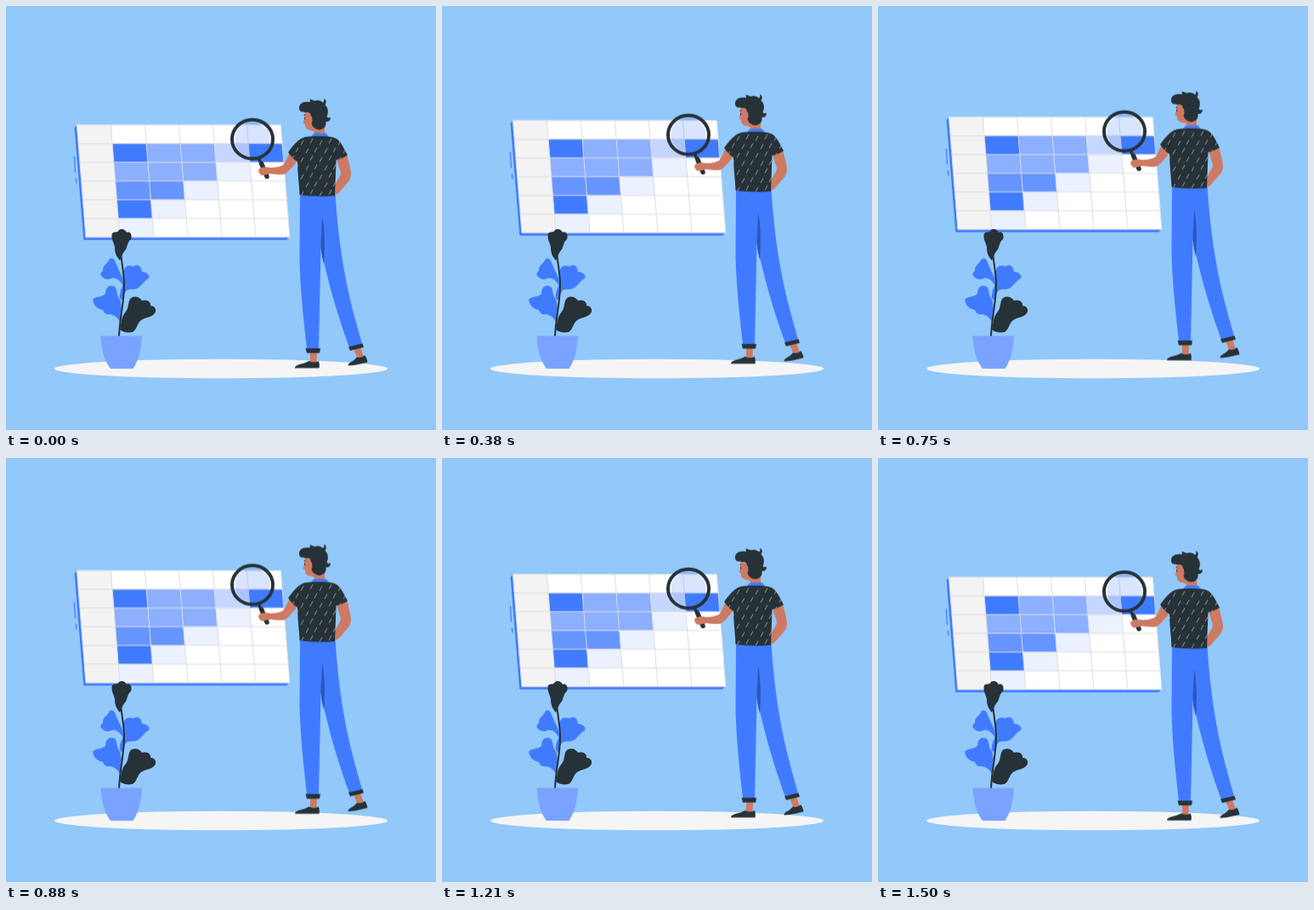
Animation of 506x498 px, one loop 1.54 s. Source, as an HTML page:

```html
<!DOCTYPE html>
<html lang="en">
<head>
<meta charset="utf-8">
<title>Chart review</title>
<style>
  html, body { margin: 0; width: 100%; height: 100%; overflow: hidden; background: #92c8fa; }
  svg { display: block; width: 100vw; height: 100vh; }
  .blue { fill: #407bff; }
  .dark { fill: #263238; }
  .skin { fill: #ce7a63; }
  .float { animation: float 1540ms linear infinite; }
  @keyframes float {
    0% { transform: translateY(0); }
    46% { transform: translateY(-9.9px); }
    96% { transform: translateY(.3px); }
    100% { transform: translateY(0); }
  }
</style>
</head>
<body>
<svg viewBox="0 0 506 498">
  <defs>
    <pattern id="dashes" width="22" height="20" patternUnits="userSpaceOnUse" patternTransform="translate(345 155)">
      <path d="M2 8.500L5 3M13 6.500L16 1M8 18L11 12.500M18 17L21 11.500" stroke="#a9b3b8" stroke-width=".8"/>
    </pattern>
  </defs>

  <ellipse cx="253" cy="426" rx="196" ry="11.300" fill="#f5f5f5"/>

  <g class="float">
    <g id="board">
      <path class="blue" d="M83.400 140L80.600 143.200L91.300 275H330L333 272Z"/>
      <path d="M80.300 177L81.500 195.500M82.300 202.500L82.900 208.500" stroke="#407bff" stroke-width="1.200"/>
      <g id="grid" transform="matrix(1 0 .08 1 83.4 139.8)">
        <path fill="#fff" d="M0 0H240V132H0Z"/>
        <path fill="#f3f3f3" d="M0 0H40V132H0Z"/>
        <g id="cells"></g>
        <path id="lines" fill="none" stroke="#dcdde2" stroke-width=".9"/>
      </g>
    </g>

    <g id="man">
      <path class="skin" d="M389 180L394 196C394 200 389 205 387 211V222C391 221 394 217 398 212C403 207 406 203 406 197C405 188 403 182 401 175Z"/>
      <g id="feet">
        <path class="skin" d="M358 406H366L365.500 419H358ZM409 403L417 401L421 412L414 415Z"/>
        <path class="dark" d="M340 425C340 421 350 421 357 417C360 419 365 419 367.500 417C369 419 369 422 368.500 425.500H340.500Z"/>
        <path class="dark" d="M402.500 422.500C402 419 409 418 413 412.500C417 414 420 412 422.500 410.500C424 413 425 416 425.500 418.500C418 420 411 423 402.500 422.500Z"/>
      </g>
      <path class="blue" d="M346 221H387.500C389 245 392 277 398 311C403 341 412 372 419 397L404 401C394 374 380 331 370.500 284L368 403H354C350 367 346 331 345.500 298Z"/>
      <path fill="#2c57b7" d="M372 248C375 259 375.500 283 374 303C371.500 295 370.500 288 370.500 280Z"/>
      <path class="dark" d="M352.500 402.300H370L369 407.800H354ZM403 400.500L419.500 396.500L421 401L405 405Z"/>

      <g id="head">
        <path class="skin" d="M352 122L350.800 133L349.500 137.500L351.800 139C352 144 354 146 362 147L364 151H375V140L367 122Z"/>
        <path class="dark" d="M345 121C344 115 350 111.500 357 113C358.500 113 358 110.500 357 109.800C360.500 109.500 362 112 364 111.500C368 110.500 371 111.500 373 113.500C375 112 374.500 110 374 109C377 110 377.500 113 375.500 116.500C379 119 380 126 377.500 130C379 132 380.500 131.500 382 131C382 135 379 136.500 376.500 136C377 141 375 144.500 369 145.500C364 145 360 142 359.500 138L358.500 127C356 123.500 353 126 350.500 124.500C348 125 345.500 124 345 121Z"/>
        <path class="skin" d="M360 130C356 128.500 354.500 132 355.500 135C356.500 139 360 138 360.500 136Z"/>
        <path d="M350.500 128.500L352.300 128M351.600 131V133.500" stroke="#263238" stroke-width="1"/>
      </g>
      <path class="blue" d="M358.500 154L362.500 149.500H376.500L380 154Z"/>
      <path class="skin" d="M334 172C331 178 329 183 326.500 186.500C322 189.500 314 190 308 190L308 197C316 197.500 323 199 328.500 197.500C334 193 339 187 343 182Z"/>
      <g id="shirt">
        <path class="dark" d="M352 154C361 153 373 152.500 383 154C391 155 395 162 398 168L402 175.500C398 178 394 180 388.500 181L387 223C374 224 360 224 345.500 222C345 209 343 196 343 183C339 181 335 176 332 172C338 164 344 156 352 154Z"/>
      </g>
    </g>

    <g id="glass">
      <ellipse cx="290" cy="156.700" rx="20.500" ry="20" fill="#407bff" opacity=".2"/>
      <ellipse cx="290" cy="156.700" rx="24" ry="22.900" fill="none" stroke="#263238" stroke-width="4"/>
      <path d="M297.500 180L302 189" stroke="#263238" stroke-width="3.500"/>
      <path d="M300.500 185L307 200.500" stroke="#263238" stroke-width="5.500" stroke-linecap="round"/>
      <path class="skin" d="M297.500 192C300 189.500 305 188.500 310 190L311 197C307 197.500 304 199.500 300.500 199C297.500 197 296.500 194 297.500 192Z"/>
    </g>
  </g>

  <g id="plant">
    <path class="blue" d="M138 329C134 322 130 319 125 319.500C121 321 118 322 116 320C112 318 109 315 114 311C114 303 119 304 122 297C128 295 128 301 131 306C133 312 138 317 138 329Z"/>
    <path class="blue" d="M134 343C133 336 136 332 138 327C137 318 138 312 139 309C143 302 148 307 152 305C158 303 159 308 160 312C167 313 170 317 168 320C163 322 162 326 158 329C152 335 147 331 142 334C139 337 138 341 136 346Z"/>
    <path class="blue" d="M135 373C132 366 128 363 122 362C117 363 115 360 114 357C107 356 103 351 102 345C106 340 112 343 117 338C117 329 124 326 129 331C131 335 130 339 133 343C137 349 136 360 135 373Z"/>
    <path class="dark" d="M134 380C136 372 135 366 141 359C145 354 143 347 147 343C153 340 157 342 160 346C166 344 171 348 170 352C175 352 178 357 175 361C170 367 162 365 157 371C154 375 153 381 149 383C143 384 137 383 134 380Z"/>
    <path class="dark" d="M134 299C129 293 128 289 128 283C127 278 123 273 125 267C128 264 131 267 133 263C136 261 140 262 142 266C146 264 149 269 147 274C143 277 143 282 141 286C137 290 136 295 134 299Z"/>
    <path fill="none" stroke="#263238" stroke-width="2" d="M133 388C134 365 139 348 139 328C139 313 136 303 135 288"/>
    <path fill="#7aa3ff" d="M111.500 387.500H159.800C159 405 156 416 149.500 426H123C116 417 112.500 405 111.500 387.500Z"/>
  </g>
</svg>
<script>
  const NS = 'http://www.w3.org/2000/svg';
  const W = 40, H = 22;
  const tones = { a: '#407bff', b: '#6695ff', c: '#8cafff', d: '#c6d7ff', e: '#ebf1ff' };
  const rows = ['accda', 'ccce', 'bbe', 'ae', 'e'];
  const cells = document.getElementById('cells');

  rows.forEach((row, r) => [...row].forEach((tone, c) => {
    const cell = document.createElementNS(NS, 'rect');
    const box = { x: (c + 1) * W, y: (r + 1) * H, width: W, height: H, fill: tones[tone] };
    for (const key in box) cell.setAttribute(key, box[key]);
    cells.append(cell);
  }));

  let d = '';
  for (let i = 0; i < 7; i++) d += `M${i * W} 0V${6 * H}M0 ${i * H}H${6 * W}`;
  document.getElementById('lines').setAttribute('d', d);

  const weave = document.querySelector('#shirt path').cloneNode();
  weave.removeAttribute('class');
  weave.setAttribute('fill', 'url(#dashes)');
  document.getElementById('shirt').append(weave);
</script>
</body>
</html>
```
